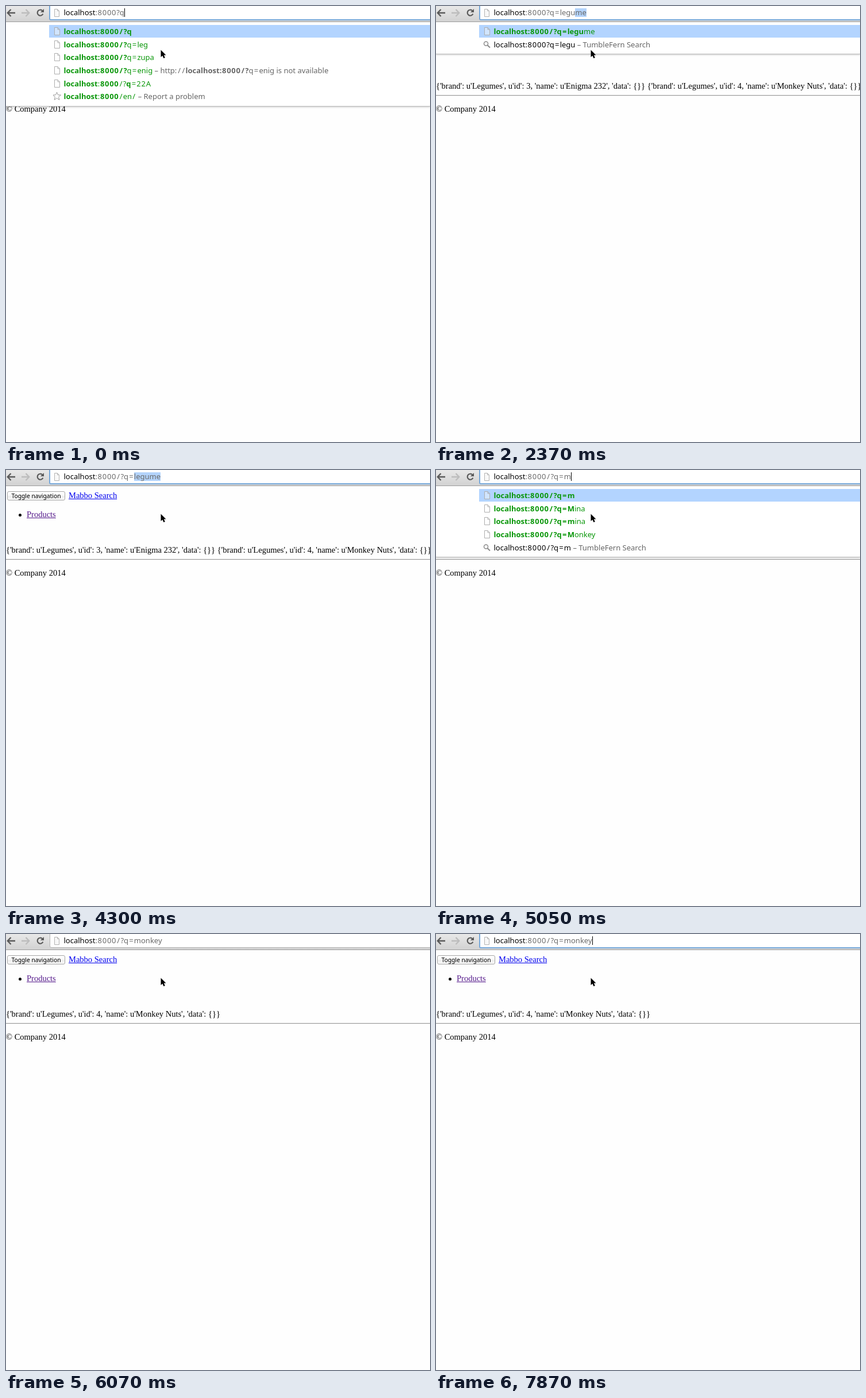
An HTML page that plays this animation: 738 by 759 pixels, repeating every 8 s.

```html
<!DOCTYPE html>
<html lang="en">
<head>
<meta charset="utf-8">
<title>Search by address bar</title>
<style>
html, body { margin: 0; width: 100%; height: 100%; overflow: hidden; background: #fefefe; }
#stage { position: relative; width: 738px; height: 759px; overflow: hidden; white-space: pre;
  font: 14.5px/20px "Liberation Serif", serif; color: #000; }
#stage > *, .row > svg, .row > div { position: absolute; }
.ui, #drop { font: 13px/22px "Noto Sans", "Open Sans", sans-serif; }
.n { letter-spacing: .7px; }
.p { padding: 0 1.2px; }

#bar { left: 0; top: 0; width: 738px; height: 27px; border-bottom: 1px solid #9c9c9c;
  background: linear-gradient(#e8e8e8, #d2d2d2); }
#field { left: 76px; top: -6px; width: 680px; height: 30px; background: #fff;
  border: 1px solid #b4b4b4; border-radius: 3px; box-sizing: border-box; }
#field.focus { left: 75px; height: 31px; border: 2px solid #78a9da; }
#url { left: 100.5px; top: 4px; line-height: 15px; color: #6a6a6a; }
#url span { line-height: 15px; }
.host { color: #000; }
.sel { display: inline-block; background: #b3d3fb; }
.caret { display: inline-block; width: 1px; height: 15px; margin-right: -1px;
  background: #000; vertical-align: top; }

#drop { left: 0; top: 28px; width: 738px; background: #fff; border-bottom: 1px solid #bcbcbc;
  box-shadow: 0 1px 3px rgba(0, 0, 0, .22); }
.row { position: absolute; left: 75px; width: 663px; height: 22px; }
.row.on { background: #b3d4ff; }
.row svg { left: 7px; top: 3px; }
.row div { left: 25.5px; top: 0; color: #0a970a; }
.row .plain { color: #000; }
.row em { font-style: normal; color: #666; }

#toggle { left: 2px; top: 37px; width: 101px; height: 16px; box-sizing: border-box;
  border: 1px solid #a6a6a6; border-radius: 3px; text-align: center;
  background: linear-gradient(#fff, #f8f8f8 50%, #eee 51%, #f7f7f7);
  font: 10.3px/14px "Noto Sans", "Open Sans", sans-serif; }
.link { text-decoration: underline; color: #551a8b; }
#dot { left: 21.5px; top: 75.5px; width: 5px; height: 5px; border-radius: 50%; background: #000; }
#rule { left: 0; top: 155px; width: 738px; height: 1px; background: #999; border-bottom: 1px solid #eee; }
</style>
</head>
<body>
<div id="stage">
  <div id="toggle">Toggle navigation</div>
  <div id="brand" class="link" style="left:109px;top:34px">Mabbo Search</div>
  <div id="dot"></div>
  <div class="link" style="left:36px;top:67px">Products</div>
  <div id="result" style="left:0;top:129px"></div>
  <div id="rule"></div>
  <div style="left:0;top:169px">© Company 2014</div>

  <div id="drop"></div>
  <div id="bar"></div>
  <div id="field"></div>
  <svg width="100" height="27" style="left:0;top:0" fill="none" stroke="#5a5a5a" stroke-width="2.4">
    <path d="M16 12H3M8.5 6L2.8 12L8.5 18"/>
    <path d="M27 12H40M34.500 6L40.200 12L34.500 18" stroke="#bdbdbd"/>
    <g id="reload">
      <path d="M63.400 8.400A5 5 0 1 0 64.300 13.600" stroke-width="2.200"/>
      <path d="M66 5V11H60Z" fill="#5a5a5a" stroke="none"/>
    </g>
    <path id="stop" d="M55 7L64.500 16.500M64.500 7L55 16.500"/>
    <path d="M84.500 5.500H89.500L92.500 8.500V18.500H84.500ZM89.500 5.500V8.500H92.500" fill="#f8f8f8" stroke="#b2b2b2" stroke-width="1"/>
  </svg>
  <div id="url" class="ui"></div>
  <svg width="14" height="20" viewBox="0 0 14 20" style="left:268px;top:75px">
    <path d="M1.500 1.500V14L4.400 11.400L6.400 16L8.800 15L6.800 10.600H10.500Z" fill="#000" stroke="#fff" stroke-width="1" paint-order="stroke"/>
  </svg>
</div>

<script>
const LOOP = 8000, STEP = 22.67;
const $ = id => document.getElementById(id);

const icons = {
  page: '<path d="M2.500 1.500H8L11.500 5V14.500H2.500ZM8 1.500V5H11.500" fill="#fff" fill-opacity=".4" stroke="#adadad"/>',
  star: '<path d="M6.500 1L8.400 5.700L13.500 6L9.600 9.300L10.900 14.300L6.500 11.500L2.100 14.300L3.400 9.300L-.5 6L4.600 5.700Z" fill="#fff" stroke="#999"/>',
  find: '<circle cx="5" cy="6.500" r="3.500" fill="none" stroke="#8c8c8c" stroke-width="1.500"/><path d="M7.600 9.200L12 13.500" stroke="#8c8c8c" stroke-width="2"/>'
};

// Widens digits and symbols; text between asterisks is bold.
const space = s => s.replace(/[\d:]+|[\/=]/g, m =>
  `<span class="${/[\/=]/.test(m) ? 'p' : 'n'}">${m}</span>`);
const mark = s => s.split('*').map((part, i) =>
  i % 2 ? `<b>${space(part)}</b>` : space(part)).join('');

const page = (text, note) => ({ icon: 'page', text, note });
const hit = (bold, rest = '', note) => page(`*localhost:8000/?${bold}*${rest}`, note);
const loose = word => page(`*localhost*:*8000*/?*q*=${word}`);
const find = path => ({ icon: 'find', text: 'localhost:8000' + path, note: 'TumbleFern Search' });
const gone = (bold, rest) => hit(bold, rest,
  `http://*localhost:8000/?${bold}*${rest} is not available`);

const recent = (bold, rest, last) => [
  hit(bold + rest.slice(0, 0), rest + 'leg'), hit(bold, rest + 'zupa'),
  gone(bold, rest + 'enig'), loose('22A'), last
];
const report = { icon: 'star', text: '*localhost*:*8000*/en/', note: 'Report a problem' };
const legs = (typed, rest) => [
  hit('q=' + typed, rest), hit('q=' + typed, rest + 'ume'),
  hit('q=' + typed, rest + 'u'), find('?q=' + typed)
];
const monks = (typed, words) => [
  hit('q=' + typed),
  ...words.map(w => hit('q=' + w.slice(0, typed.length), w.slice(typed.length))),
  find('/?q=' + typed)
];

const item = (id, name) => `{'brand': u'Legumes', u'id': ${id}, 'name': u'${name}', 'data': {}}`;
const nuts = item(4, 'Monkey Nuts');
const both = item(3, 'Enigma 232') + ' ' + nuts;

// Each step changes only what it names.
const steps = [
  { t: 0, path: '?q', sel: '', all: false, caret: true, focus: true, busy: false,
    brand: '#551a8b', result: both, rows: [hit('q'), ...recent('', 'q=', report)] },
  { t: 150, rows: [hit('q'), ...recent('q', '=', loose('Monk'))] },
  { t: 440, path: '?q=', rows: [hit('q='), ...recent('q=', '', loose('Monk'))] },
  { t: 1040, caret: false },
  { t: 1630, caret: true },
  { t: 1930, path: '?q=l', sel: 'eg', caret: false, rows: legs('l', 'eg') },
  { t: 2080, path: '?q=le', sel: 'g', rows: legs('le', 'g') },
  { t: 2230, path: '?q=leg', sel: '', caret: true },
  { t: 2370, path: '?q=legu', sel: 'me', caret: false, rows: [hit('q=legu', 'me'), find('?q=legu')] },
  { t: 2520, path: '/?q=legume', sel: '', focus: false, busy: true, rows: [] },
  { t: 2660, brand: '#0000ee' },
  { t: 2810, busy: false },
  { t: 3850, focus: true, all: true },
  { t: 4000, all: false, caret: true },
  { t: 4300, path: '/?q=', sel: 'legume', caret: false },
  { t: 5050, path: '/?q=m', sel: '', caret: true, rows: monks('m', ['Mina', 'mina', 'Monkey']) },
  { t: 5200, path: '/?q=mo', rows: monks('mo', ['Monkey', 'Monk']) },
  { t: 5340, path: '/?q=mon', rows: monks('mon', ['Monkey', 'Monk']) },
  { t: 5490, path: '/?q=monke', rows: monks('monke', ['Monkey']) },
  { t: 5640, path: '/?q=monkey', rows: monks('monkey', ['Monkey']) },
  { t: 5780, caret: false, focus: false, busy: true, rows: [] },
  { t: 5920, result: nuts },
  { t: 6070, busy: false },
  { t: 7420, focus: true, all: true },
  { t: 7870, all: false, caret: true }
];
const states = [];
steps.forEach((s, i) => states.push({ ...states[i - 1], ...s }));

const rowHtml = (r, i) => `<div class="row${i ? '' : ' on'}" style="top:${Math.round(5 + i * STEP)}px">
<svg width="15" height="16">${icons[r.icon]}</svg><div class="${r.icon === 'find' ? 'plain' : ''}">${
  mark(r.text)}${r.note ? `<em> – ${mark(r.note)}</em>` : ''}</div></div>`;

function draw(s) {
  let url = `<span class="host">localhost</span>${space(':8000' + s.path)}`;
  if (s.sel) url += `<span class="sel">${s.sel}</span>`;
  if (s.all) url = `<span class="sel">${url}</span>`;
  if (s.caret) url += '<span class="caret"></span>';
  $('url').innerHTML = url;
  $('field').className = s.focus ? 'focus' : '';
  $('reload').style.display = s.busy ? 'none' : '';
  $('stop').style.display = s.busy ? '' : 'none';
  $('brand').style.color = s.brand;
  $('result').textContent = s.result;
  const n = s.rows.length;
  $('drop').style.display = n ? '' : 'none';
  $('drop').style.height = Math.round(9.5 + n * STEP) + 'px';
  $('drop').innerHTML = s.rows.map(rowHtml).join('');
}

const start = performance.now();
let shown;
function tick() {
  const t = (performance.now() - start) % LOOP;
  const now = states.findLast(s => s.t <= t) || states[0];
  if (now !== shown) draw(shown = now);
  requestAnimationFrame(tick);
}
tick();
</script>
</body>
</html>
```
